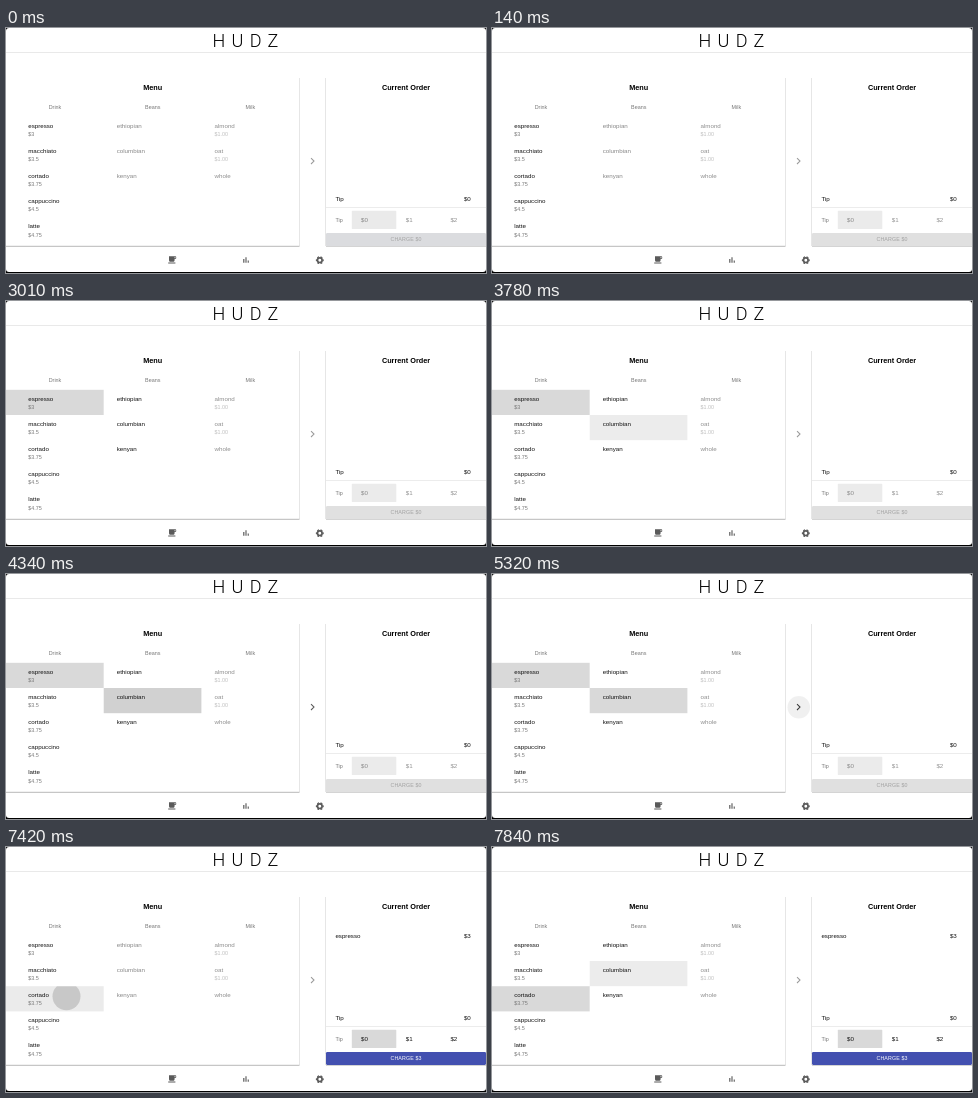
These frames come from a looping animation (480 by 245 pixels, 8 s). An HTML page:

```html
<!DOCTYPE html>
<html lang="en">
<head>
<meta charset="utf-8">
<title>Order screen</title>
<style>
  html, body { margin: 0; width: 100%; height: 100%; overflow: hidden; background: #000; }
  svg { display: block; width: 100%; height: 100%; }
  text { font-family: "Liberation Sans", Arial, sans-serif; font-size: 6.2px; fill: #111; }
  .small { font-size: 5.4px; fill: #777; }
  .title { font-size: 7.3px; font-weight: bold; fill: #000; }
  .brand { font-family: Roboto, sans-serif; font-size: 18px; font-weight: 300; letter-spacing: 6.3px; fill: #000; }
  .charge { font-size: 5.3px; letter-spacing: .12px; }
  .mid { text-anchor: middle; }
  .end { text-anchor: end; }
</style>
</head>
<body>
<svg id="stage" viewBox="0 0 480 245" xmlns="http://www.w3.org/2000/svg"></svg>
<script>
const LOOP = 8000, STEP = 70;
const COL = 97.7, ROW = 25.2, TOP = 88.8;
const stage = document.getElementById('stage');

function el(tag, attrs, parent = stage) {
  const node = document.createElementNS('http://www.w3.org/2000/svg', tag);
  for (const k in attrs) node.setAttribute(k, attrs[k]);
  parent.appendChild(node);
  return node;
}
function label(str, x, y, cls = '', parent = stage) {
  const node = el('text', { x, y, class: cls }, parent);
  node.textContent = str;
  return node;
}
const rect = (x, y, width, height, fill, more) => el('rect', { x, y, width, height, fill, ...more });
const set = (node, k, v) => node.setAttribute(k, v);

// Piecewise linear value over [time, value] pairs
function track(t, keys) {
  if (t <= keys[0][0]) return keys[0][1];
  for (let i = 1; i < keys.length; i++) {
    const [a, u] = keys[i - 1], [b, v] = keys[i];
    if (t <= b) return u + (v - u) * (t - a) / (b - a);
  }
  return keys[keys.length - 1][1];
}
function mix(a, b, k) {
  return `rgb(${a.map((v, i) => Math.round(v + (b[i] - v) * k)).join()})`;
}

// Window, header and panels
rect(0, 0, 480, 244, '#fff', { rx: 3 });
rect(0, 24, 480, .8, '#e4e4e4');
label('HUDZ', 206.5, 18.7, 'brand');
rect(293, 50, .7, 168, '#dcdcdc');
rect(0, 217.8, 293.5, 1, '#b8b8b8');
rect(319.2, 50, .7, 168, '#dcdcdc');
rect(320, 217.6, 160, 1, '#b8b8b8');

// Menu cells and ripples sit under the text
const cell = (c, r) => rect(c * COL, TOP + r * ROW, COL, ROW, '#000', { opacity: 0 });
function ripple(c, r, cx, cy, start, length) {
  const id = `clip${c}${r}`;
  const clip = el('clipPath', { id });
  el('rect', { x: c * COL, y: TOP + r * ROW, width: COL, height: ROW }, clip);
  const node = el('circle', { cx, cy, r: 0, 'clip-path': `url(#${id})` });
  return { node, start, length };
}
const cells = [
  { node: cell(0, 0), keys: [[2729, 0], [2730, .05], [2800, .075], [3010, .15], [5740, .15], [5880, 0]] },
  { node: cell(1, 1), keys: [[3779, 0], [3780, .075], [4200, .075], [4480, .15], [5740, .15], [5880, 0], [7839, 0], [7840, .075]] },
  { node: cell(0, 2), keys: [[6789, 0], [6790, .08], [7420, .08], [7700, .15]] }
];
const ripples = [
  ripple(0, 0, 35, 101, 2800, 210),
  ripple(1, 1, 126, 123, 4130, 420),
  ripple(0, 2, 60.5, 149.3, 7420, 280)
];

label('Menu', 146.7, 62, 'title mid');
['Drink', 'Beans', 'Milk'].forEach((s, i) => label(s, 49 + i * 97.7, 81.4, 'small mid'));

function list(items, x, parent) {
  items.forEach(([name, price], i) => {
    const y = 99.6 + i * ROW;
    label(name, x, y, '', parent);
    if (price) label(price, x, y + 8.2, 'small', parent);
  });
}
list([['espresso', '$3'], ['macchiato', '$3.5'], ['cortado', '$3.75'], ['cappuccino', '$4.5'], ['latte', '$4.75']], 22.2);
const beans = el('g', {});
list([['ethiopian'], ['columbian'], ['kenyan']], 110.7, beans);
list([['almond', '$1.00'], ['oat', '$1.00'], ['whole']], 208.5, el('g', { opacity: .48 }));

// Arrow button
const halo = el('circle', { cx: 306.8, cy: 133.2, r: 11.3, opacity: 0 });
const arrow = el('path', { d: 'M305 130.2l3 2.9l-3 2.9', fill: 'none', 'stroke-width': 1.05 });

// Current order
label('Current Order', 400, 62, 'title mid');
const order = el('g', {});
label('espresso', 329.4, 91.2, '', order);
label('$3', 464.8, 91.2, 'end', order);
label('Tip', 329.4, 172.6);
label('$0', 464.8, 172.6, 'end');
rect(320, 179, 160, .7, '#e4e4e4');
label('Tip', 329.4, 194, 'small');
const tipBox = rect(345.8, 182.8, 44.5, 18.3, '#000', { rx: .6 });
const tips = el('g', {});
[0, 1, 2].forEach(i => label('$' + i, 355 + i * 44.7, 193.9, '', tips));
const button = rect(320, 205, 160, 12.9, '#e0e0e0', { rx: 1.3 });
const charge = label('', 400, 213.3, 'charge mid');

// Bottom navigation
const icons = el('g', { fill: '#5a5a5a' });
el('path', {
  transform: 'translate(161.4 227) scale(.4)', 'fill-rule': 'evenodd',
  d: 'M20 3H4v10c0 2.2 1.8 4 4 4h6c2.2 0 4-1.8 4-4v-3h2c1.1 0 2-.9 2-2V5c0-1.1-.9-2-2-2zm0 5h-2V5h2zM2 21h18v-2H2z'
}, icons);
el('path', {
  transform: 'translate(235.2 227.2) scale(.4)',
  d: 'M5 9.2h3V19H5zM10.6 5h2.8v14h-2.8zM16.2 13H19v6h-2.8z'
}, icons);
const gear = { cx: 313.8, cy: 232.2, fill: 'none', stroke: '#5a5a5a' };
el('circle', { ...gear, r: 2.3, 'stroke-width': 1.7 }, icons);
el('circle', { ...gear, r: 3.4, 'stroke-width': 1.1, pathLength: 12, 'stroke-dasharray': '1.1 .9', 'stroke-dashoffset': .55 }, icons);

function draw(t) {
  for (const c of cells) set(c.node, 'opacity', track(t, c.keys));
  for (const p of ripples) {
    const age = t - p.start, live = age >= 0 && age < p.length;
    set(p.node, 'r', live ? 14 + age * .28 : 0);
    set(p.node, 'opacity', live ? .15 * (1 - age / p.length) : 0);
  }
  const beansOn = track(t, [[2800, 0], [2940, 1], [5740, 1], [5880, 0], [7490, 0], [7630, 1]]);
  set(beans, 'opacity', .5 + .5 * beansOn);

  set(halo, 'opacity', track(t, [[5319, 0], [5320, .06], [5739, .06], [5740, .15], [5950, 0]]));
  const arrowOn = track(t, [[4200, 0], [4410, 1], [5740, 1], [5950, 0]]);
  set(arrow, 'stroke', mix([155, 155, 155], [60, 60, 60], arrowOn));

  const paid = track(t, [[0, .03], [140, 0], [5740, 0], [5950, 1]]);
  set(order, 'opacity', t >= 5810 ? 1 : 0);
  set(tipBox, 'opacity', .08 + .07 * paid);
  set(tips, 'opacity', .45 + .55 * paid);
  set(button, 'fill', mix([224, 224, 224], [67, 80, 176], paid));
  charge.style.fill = mix([160, 160, 160], [255, 255, 255], paid);
  charge.textContent = t >= 5810 ? 'CHARGE $3' : 'CHARGE $0';
}

// The screen refreshes in even steps
function tick() {
  const t = performance.now() % LOOP;
  draw(Math.floor(t / STEP) * STEP);
  requestAnimationFrame(tick);
}
tick();
</script>
</body>
</html>
```
